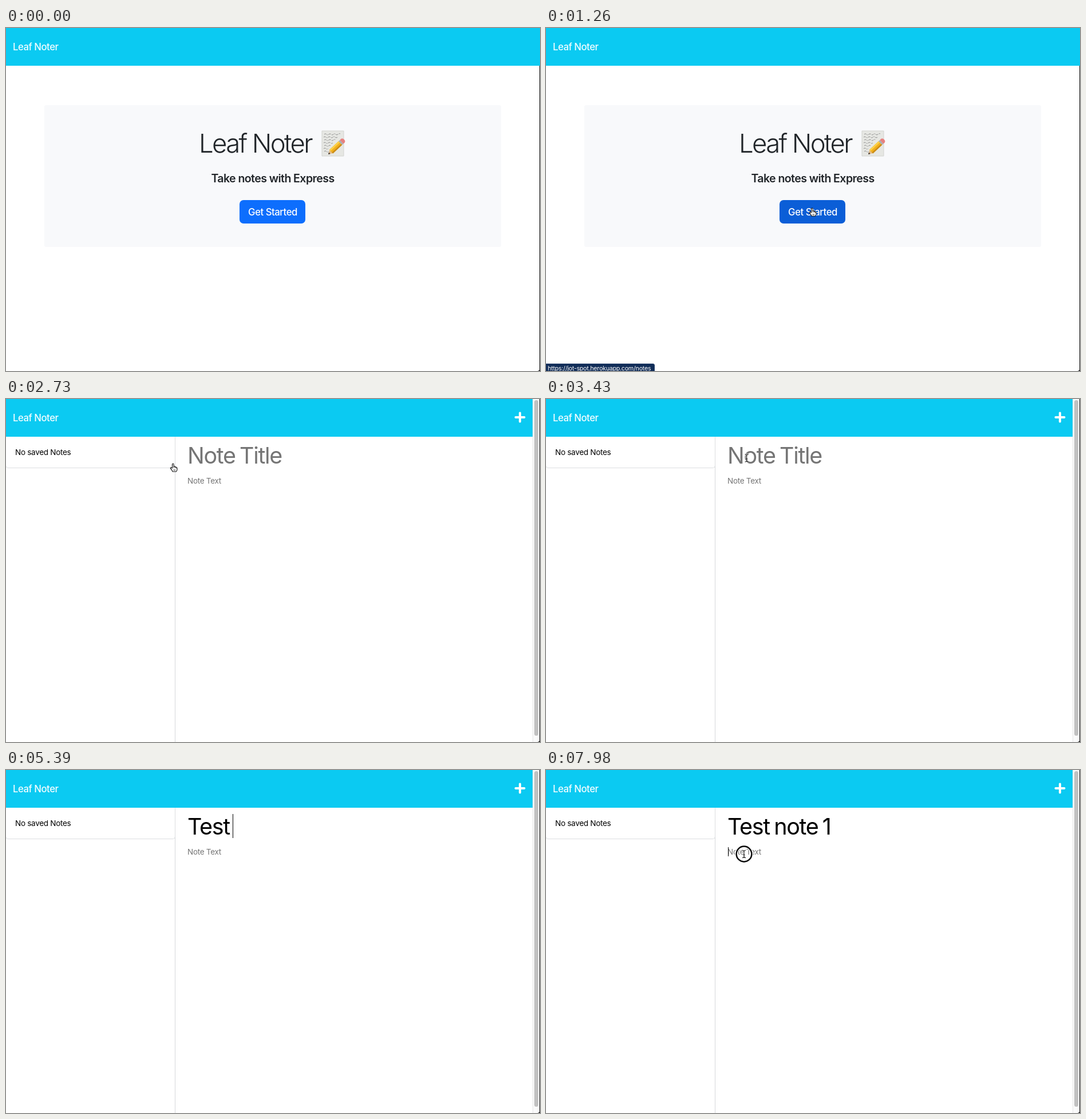
These frames come from a looping animation (933 by 600 pixels, 8000 ms). An HTML page with a canvas:

```html
<!DOCTYPE html>
<html lang="en">
<head>
<meta charset="utf-8">
<title>Leaf Noter</title>
<style>
  html, body { margin: 0; width: 100%; height: 100%; overflow: hidden; background: #fff; }
  body { position: relative; font-family: Inter, "Open Sans", sans-serif; font-optical-sizing: none; color: #000; }
  div, canvas, svg, p { position: absolute; box-sizing: border-box; }
  .page { left: 0; top: 0; width: 933px; height: 600px; }
  .nav { left: 0; top: 0; width: 933px; height: 66px; background: #0bcaf2; }
  #notes .nav { width: 920px; }
  /* zero line height: the top value is the middle of the capitals */
  p { margin: 0; line-height: 0; white-space: pre; }
  .brand { left: 12px; top: 32.5px; font-size: 16.7px; font-weight: 500; letter-spacing: -.028em; color: #f4fdff; }
  .mid { left: 66px; width: 800px; text-align: center; }
  .hero { left: 67px; top: 135px; width: 798px; height: 247.5px; background: #f8f9fb; border-radius: 3px; }
  .name { left: 337px; top: 202px; font-size: 45.5px; font-weight: 350; letter-spacing: -.058em; color: #212529; }
  .sub { top: 262.5px; font-size: 19.6px; font-weight: 600; letter-spacing: -.031em; color: #212529; }
  .btn { left: 408px; top: 300.5px; width: 115px; height: 41.5px; border-radius: 7px; background: #0d6efd; }
  .btn-text { top: 321.5px; font-size: 16.8px; font-weight: 500; letter-spacing: -.03em; color: #fff; }
  .column { left: 295px; top: 66px; width: 1px; height: 534px; background: #d6d8da; }
  .card { left: -1px; top: 66px; width: 297px; height: 55px; border: 1px solid #dcdee0; border-top: 0; border-radius: 0 0 5px 5px; }
  .body { font-size: 13.5px; letter-spacing: -.021em; }
  #title { left: 317px; top: 99px; font-size: 39.5px; letter-spacing: -.034em; word-spacing: -.06em; }
  .hint { color: #757575; }
  #caret { width: 1px; background: #000; }
  .track { left: 920px; top: 0; width: 12px; height: 600px; background: #fafafa; border-left: 1px solid #e6e6e6; }
  .thumb { left: 923px; top: 2px; width: 7px; height: 587px; border-radius: 4px; background: #c1c1c1; }
  #status { left: -1px; top: 587px; width: 191px; height: 16px; background: #112d58; border: 1px solid #2c4670; border-radius: 0 3px 0 0; }
  #status p { left: 3px; top: 7.5px; font-size: 10.7px; letter-spacing: -.024em; color: #fff; }
  .edge { left: 932px; top: 66px; width: 1px; height: 534px; background: #1c1c1c; }
  #notes .edge { top: 0; height: 600px; }
  .corner { left: 928px; top: 595px; width: 5px; height: 5px; background: radial-gradient(circle at 0 0, transparent 4.5px, #1c1c1c 5.5px); }
  #pointer { left: 0; top: 0; }
</style>
</head>
<body>
<div class="page" id="home">
  <div class="nav"></div>
  <p class="brand">Leaf Noter</p>
  <div class="hero"></div>
  <p class="name">Leaf Noter</p>
  <svg style="left:550px;top:178px" width="46" height="48" viewBox="0 0 46 48">
    <path d="M2 2H40V46H2Z" fill="#e6e7e3" stroke="#d3d4d0"/>
    <g fill="none" stroke="#777" stroke-width=".8" stroke-dasharray="4 1 2 1 5 1.5">
      <path d="M6 8q2-2 4 0t4 0 4 0 4 0 4 0 4 0 4-1"/>
      <path d="M5 13q2-2 4 0t4 0 4 0 4 0 4 0 4 0"/>
      <path d="M6 18q2-2 4 0t4 0 4 0 4 0 4 0"/>
      <path d="M5 23q2-2 4 0t4 0 4 0 4 0"/>
      <path d="M6 28q2-2 4 0t4 0 3 0"/>
      <path d="M5 33q2-2 4 0t4 0"/>
      <path d="M6 38q2-2 4 0t4 0"/>
    </g>
    <g transform="translate(13 43) rotate(-43)">
      <path d="M0 0L8-4.500V4.500Z" fill="#e3b983"/>
      <path d="M0 0L3.200-1.800V1.800Z" fill="#3a3330"/>
      <path d="M7-4.500H29V4.500H7Z" fill="#f2b01c"/>
      <path d="M7-4.500H29V-1.500H7Z" fill="#fbd04a"/>
      <path d="M7 2H29V4.500H7Z" fill="#c98a17"/>
      <path d="M29-4.500H32V4.500H29Z" fill="#a9adb2"/>
      <path d="M32-4.500H35Q38-4 38 0T35 4.500H32Z" fill="#e8817f"/>
    </g>
  </svg>
  <p class="mid sub">Take notes with Express</p>
  <div class="btn" id="start"></div>
  <p class="mid btn-text">Get Started</p>
  <div class="edge"></div>
</div>

<div class="page" id="notes">
  <div class="nav"></div>
  <p class="brand">Leaf Noter</p>
  <svg style="left:886px;top:20px" width="24" height="24">
    <path d="M12 4.500V19.500M4.500 12H19.500" stroke="#fff" stroke-width="4" stroke-linecap="round"/>
  </svg>
  <div class="column"></div>
  <div id="list">
    <div class="card"></div>
    <p class="body" style="left:16px;top:93px">No saved Notes</p>
  </div>
  <p id="title"></p>
  <p class="body hint" style="left:317px;top:142.5px">Note Text</p>
  <div id="caret"></div>
  <div class="track"></div>
  <div class="thumb"></div>
  <div class="edge"></div>
</div>

<div id="status"><p>https://jot-spot.herokuapp.com/notes</p></div>
<div class="corner"></div>
<canvas id="pointer" width="933" height="600"></canvas>

<script>
const LOOP = 8000, STEP = 70, BLINK = 490;
const el = id => document.getElementById(id);
const [home, notes, list, title, caret, link, start, pointer] =
  ['home', 'notes', 'list', 'title', 'caret', 'status', 'start', 'pointer'].map(el);
const g = pointer.getContext('2d');

const NOTE = 'Test note 1';
const keys = [4830, 4900, 5040, 5110, 5390, 5670, 5880, 5950, 6090, 6510, 6650];
const FOCUS_TITLE = 4130, FOCUS_TEXT = 7980, OPEN = 1540;

// pointer path: time, x, y
const path = [
  [70, 660, 600], [210, 545, 430], [350, 470, 328], [420, 466, 321],
  [1540, 466, 321], [1890, 457, 327], [2100, 457, 327], [2310, 420, 262],
  [2520, 338, 160], [2730, 293, 119], [2870, 328, 101], [2940, 336, 100],
  [3010, 350, 100], [3150, 350, 102], [3570, 351, 104], [3710, 354, 104],
  [3850, 359, 103], [4200, 359, 103], [4410, 360, 104], [7420, 344, 124],
  [7490, 345, 124], [7700, 320, 146], [7840, 346, 147], [8000, 346, 147]
];
const clicks = [[420, 840], [4060, 4200], [7840, 8000]];
const within = (t, a, b) => t >= a && t < b;

function locate(t) {
  const i = Math.max(1, path.findIndex(p => p[0] > t));
  const [t0, x0, y0] = path[i - 1], [t1, x1, y1] = path[i];
  const k = Math.max(0, (t - t0) / (t1 - t0));
  return [x0 + (x1 - x0) * k, y0 + (y1 - y0) * k];
}

const shapes = {
  arrow: new Path2D('M0-2V11.500L3.100 8.600 5.300 13.600 7.500 12.600 5.300 7.800H9.500Z'),
  hand: new Path2D('M-2.500 2V-4.500Q-2.500-6-1.200-6T0-4.500V-1Q2-2 2.500 0 4-.8 4.500 .8 6 .3 6 2V4Q6 6 4.500 8H-2Q-3 5-5.500 2.500-6 .8-4.500 .8Z'),
  fingers: new Path2D('M0-1V2M2.500 0V2M4.500 1V2.500M.3 4V6.500M2.300 4V6.500'),
  beam: new Path2D('M-3-6.500Q0-6.500 0-4.500 0-6.500 3-6.500M0-4.500V4.500M-3 6.500Q0 6.500 0 4.500 0 6.500 3 6.500M-1.500 1.500H1.500')
};

function stroke(shape, color, width) {
  g.strokeStyle = color;
  g.lineWidth = width;
  g.stroke(shape);
}

function fill(shape, color) {
  g.fillStyle = color;
  g.fill(shape);
}

function drawPointer(kind) {
  const shape = shapes[kind];
  g.lineJoin = 'round';
  if (kind === 'beam') {
    stroke(shape, '#fff', 2.6);
    stroke(shape, '#111', 1.1);
  } else if (kind === 'arrow') {
    stroke(shape, '#fff', 2);
    fill(shape, '#000');
  } else {
    fill(shape, '#fff');
    stroke(shape, '#111', 1.1);
    stroke(shapes.fingers, '#111', .8);
  }
}

function pointerKind(t, x, y) {
  if (t < OPEN) return t >= 910 ? 'hand' : 'arrow';
  if (x < 296) return y < 121 ? 'hand' : 'arrow';
  return 'beam';
}

function drawRing(age) {
  const ring = new Path2D();
  ring.arc(0, 0, Math.min(17, 11 + age * .017), 0, 7);
  stroke(ring, '#fff', 5);
  stroke(ring, '#0c0c0c', 2.5);
}

function showPointer(t) {
  g.clearRect(0, 0, 933, 600);
  if (t < 70 || within(t, 4830, 7420)) return;
  const [x, y] = locate(t);
  g.save();
  g.translate(x, y);
  const click = clicks.find(([down, up]) => within(t, down, up));
  if (click) drawRing(t - click[0]);
  drawPointer(pointerKind(t, x, y));
  g.restore();
}

function showCaret(t, typed) {
  const inText = t >= FOCUS_TEXT;
  const since = inText ? FOCUS_TEXT : typed ? keys[typed - 1] : FOCUS_TITLE;
  const on = t >= FOCUS_TITLE && Math.floor((t - since) / BLINK) % 2 === 0;
  const atEnd = typed && !inText;
  const x = atEnd ? title.getBoundingClientRect().right - 2 : 318;
  Object.assign(caret.style, {
    left: Math.round(x) + 'px',
    top: inText ? '135px' : '77px',
    height: inText ? '16px' : '42px'
  });
  show(caret, on);
}

function show(node, on) {
  node.style.visibility = on ? 'inherit' : 'hidden';
}

function draw(t) {
  const typed = keys.filter(k => k <= t).length;
  show(home, t < OPEN);
  show(notes, t >= OPEN);
  show(list, t >= 2170);
  show(link, within(t, 980, 2450));
  const hover = Math.min(1, Math.max(0, (t - 840) / 150));
  start.style.background = `rgb(${13 - 2 * hover},${110 - 16 * hover},${253 - 38 * hover})`;
  title.textContent = typed ? NOTE.slice(0, typed) : 'Note Title';
  title.className = typed ? '' : 'hint';
  showCaret(t, typed);
  showPointer(t);
}

const origin = performance.now();
function frame(now) {
  const t = Math.max(0, now - origin) % LOOP;
  draw(Math.floor(t / STEP) * STEP);
  requestAnimationFrame(frame);
}
draw(0);
requestAnimationFrame(frame);
</script>
</body>
</html>
```
